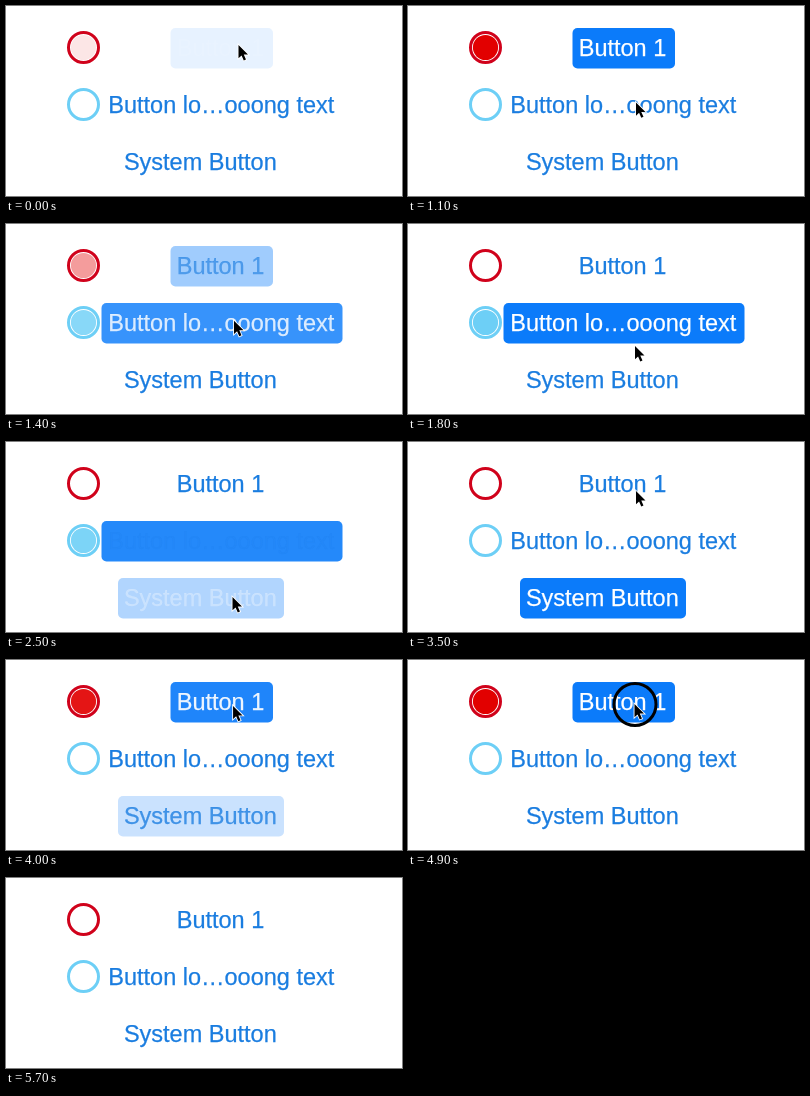
An HTML page with a canvas that plays this animation: 396x190 px, repeating every 6.3 s.

```html
<!DOCTYPE html>
<html lang="en">
<head>
<meta charset="utf-8">
<title>Radio buttons</title>
<style>
  html, body { margin: 0; width: 100%; height: 100%; overflow: hidden; background: #fff; }
  canvas { display: block; }
</style>
</head>
<body>
<canvas width="396" height="190"></canvas>
<script>
const ctx = document.querySelector('canvas').getContext('2d');
const LOOP = 6300, STEP = 100, FADE = 400;
const BLUE = '#0b7bfa', LINK = '#1a7de0';

// Each span is [selected at, deselected at] in ms.
const buttons = [
  { label: 'Button 1', x: 164.5, y: 22, w: 102.5, textX: 214.5, spans: [[-78, 1170], [3670, 4980]],
    radio: { y: 41.5, ring: '#d0021b', dot: '#e20000' } },
  { label: 'Button lo…ooong text', x: 95.5, y: 79, w: 241, textX: 215.3, spans: [[1110, 2420]],
    radio: { y: 98.5, ring: '#6dcff6', dot: '#6dcff6' } },
  { label: 'System Button', x: 112, y: 136, w: 166, textX: 194.3, spans: [[2350, 3720]] },
];

// Pointer tip: [time, x, y]
const path = [
  [0, 232.5, 39], [100, 232.5, 39], [700, 228.5, 92], [800, 228, 96], [1500, 228, 97],
  [1800, 227, 122], [2100, 226.5, 155], [2600, 226.5, 155], [3000, 227, 72],
  [3300, 228, 49], [3500, 228, 49], [4300, 226.5, 44], [5600, 226.5, 44],
];
const presses = [1000, 2300, 3600, 4900];

const ease = p => { p = Math.min(1, Math.max(0, p)); return p * p * (3 - 2 * p); };

function fillAmount(spans, t) {
  return Math.max(...spans.map(([on, off]) => ease((t - on) / FADE) * (1 - ease((t - off) / FADE))));
}

function pointerAt(t) {
  const i = path.findIndex(key => key[0] > t);
  const [t0, x0, y0] = path[i - 1], [t1, x1, y1] = path[i];
  const p = (t - t0) / (t1 - t0);
  return [x0 + (x1 - x0) * p, y0 + (y1 - y0) * p];
}

function circle(x, y, r) {
  ctx.beginPath();
  ctx.arc(x, y, r, 0, 2 * Math.PI);
}

function drawRadio({ y, ring, dot }, amount) {
  ctx.globalAlpha = amount;
  ctx.fillStyle = dot;
  circle(77.5, y, 12.6);
  ctx.fill();
  ctx.globalAlpha = 1;
  ctx.strokeStyle = ring;
  ctx.lineWidth = 3;
  circle(77.5, y, 15);
  ctx.stroke();
}

function drawButton({ label, x, y, w, textX, spans, radio }, t) {
  const amount = fillAmount(spans, t);
  const selected = spans.some(([on, off]) => t >= on && t < off);
  ctx.globalAlpha = amount;
  ctx.fillStyle = BLUE;
  ctx.beginPath();
  ctx.roundRect(x, y, w, 40.5, 5);
  ctx.fill();
  // The old label vanishes at once; the new one fades in.
  ctx.globalAlpha = selected ? amount : 1 - amount;
  ctx.fillStyle = ctx.strokeStyle = selected ? '#fff' : LINK;
  ctx.lineWidth = 0.25;
  ctx.fillText(label, textX, y + 28.3);
  ctx.strokeText(label, textX, y + 28.3);
  ctx.globalAlpha = 1;
  if (radio) drawRadio(radio, amount);
}

function drawPointer(t) {
  const [x, y] = pointerAt(t);
  if (presses.some(at => t >= at && t < at + STEP)) {
    ctx.strokeStyle = '#000';
    ctx.lineWidth = 3;
    circle(x + 0.5, y + 0.5, 21);
    ctx.stroke();
  }
  ctx.save();
  ctx.translate(x, y);
  ctx.scale(0.88, 0.88);
  const arrow = new Path2D('M0 0V15L3.5 11.8L6 17.5L8.5 16.4L6 10.8H10.8Z');
  ctx.strokeStyle = '#fff';
  ctx.lineWidth = 2;
  ctx.stroke(arrow);
  ctx.fillStyle = '#000';
  ctx.fill(arrow);
  ctx.restore();
}

function draw(now) {
  const t = Math.floor((now % LOOP) / STEP) * STEP;
  ctx.fillStyle = '#fff';
  ctx.fillRect(0, 0, 396, 190);
  ctx.font = '23.5px "Liberation Sans", Arial, sans-serif';
  ctx.textAlign = 'center';
  buttons.forEach(button => drawButton(button, t));
  if (t < 5600) drawPointer(t);
}

const start = performance.now();
function tick() {
  draw(performance.now() - start);
  requestAnimationFrame(tick);
}
tick();
</script>
</body>
</html>
```
